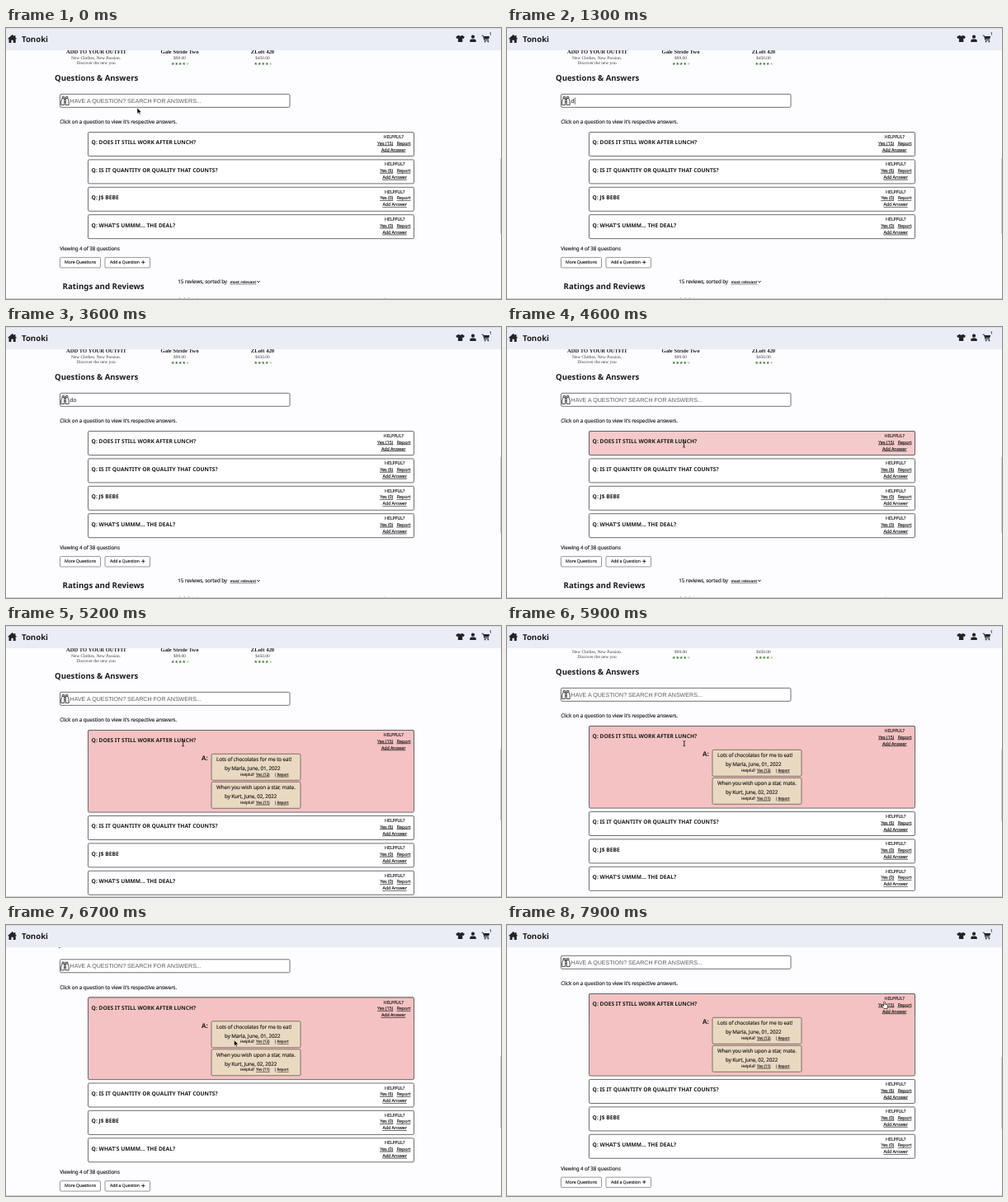
Animation, 600 px wide and 329 px high, one loop 8000 ms. Source, as an HTML page:

```html
<!DOCTYPE html>
<html lang="en">
<head>
<meta charset="utf-8">
<title>Questions &amp; Answers</title>
<style>
html, body { margin: 0; width: 100%; height: 100%; overflow: hidden; background: #fdfcfe; }
svg { display: block; width: 600px; height: 329px; }
text { font-family: "Noto Sans", "Open Sans", sans-serif; fill: #1c1c1e; letter-spacing: -.018em;
  stroke: #1c1c1e; stroke-width: .13; text-rendering: geometricPrecision; white-space: pre; }
.b { font-weight: 700; letter-spacing: 0; stroke: none; }
.m { text-anchor: middle; }
.e { text-anchor: end; }
.u { text-decoration: underline; text-decoration-thickness: .4px; text-underline-offset: .5px; }
.serif { font-family: "Liberation Serif", serif; letter-spacing: 0; stroke: none; }
.arial { font-family: "Liberation Sans", Arial, sans-serif; letter-spacing: 0; stroke: none; }
.star { font-family: "DejaVu Sans", sans-serif; letter-spacing: 0; fill: #2c7a1b; stroke: none; }
.off { fill: #bcc4ba; }
.hint { fill: #5e5e63; }
.soft { fill: #3c3c40; }
.box { fill: #fff; stroke: #55555a; stroke-width: .85; }
.btn { fill: #fff; stroke: #85858a; stroke-width: .85; }
.note { fill: #ead9c1; stroke: #6b5f56; stroke-width: .85; }
.line { fill: none; stroke: #1c1c1e; }
.ink { fill: #222326; }
</style>
</head>
<body>
<svg id="stage" viewBox="0 0 600 329"></svg>
<script>
const LOOP = 8000, STEP = 100;
const GROW = 70.6;      // height added by the opened answers
const COUNT_ROW = 13;   // height of the "Viewing" row

const text = (x, y, size, str, cls = '', id = '') =>
  `<text x="${x}" y="${y}" font-size="${size}" class="${cls}" id="${id}">${str}</text>`;
const rect = (x, y, w, h, cls, r = 1.6) =>
  `<rect x="${x}" y="${y}" width="${w}" height="${h}" rx="${r}" class="${cls}"/>`;
const stars = (x, y, size, on) =>
  text(x, y, size, `${'★'.repeat(on)}<tspan class="off">${'★'.repeat(5 - on)}</tspan>`, 'star');

const product = (x, name, price) =>
  text(x, 30.8, 6.67, name, 'serif b m') +
  text(x, 37.8, 5.4, price, 'serif m soft') +
  stars(x - 10.5, 44.8, 5, 4);

const answer = (y, words, by, yes) =>
  rect(249, y, 108, 32, 'note') +
  text(255, y + 8.8, 6.3, words) +
  text(265, y + 20.1, 6.3, by) +
  text(284, y + 26.5, 4.6, 'Helpful?') +
  text(303, y + 26.5, 4.8, `Yes (${yes})`, 'u') +
  text(325, y + 26.5, 4.4, '|') +
  text(328.5, y + 26.5, 4.6, 'Report', 'u');

const card = (i) => {
  const mid = i ? 471.2 : 469.6;
  return `<g id="card${i}">` +
    rect(99.5, 0, 395, 29, 'box') +
    (i ? '' : '<rect id="tint" x="99.5" width="395" rx="1.6" fill="#f4c2c2" stroke="#55555a" stroke-width=".85"/>') +
    text(103.6, 14.9, 6.67, '', 'b', 'q' + i) +
    text(mid, 7.6, 5.4, 'HELPFUL?', 'm') +
    text(469.2, 15, 5.6, '', 'e u', 'yes' + i) +
    text(490.4, 15, 5.4, 'Report', 'e u') +
    text(mid, 23, 5.4, 'Add Answer', 'm u') +
    (i ? '' : '<g id="answers">' + text(237, 36.6, 7.8, 'A:', 'b') +
      answer(28.8, 'Lots of chocolates for me to eat!', 'by Marla, June, 01, 2022', 12) +
      answer(62.8, 'When you wish upon a star, mate.', 'by Kurt, June, 02, 2022', 11) + '</g>') +
    '</g>';
};

const page =
  text(109.5, 30.8, 6.6, 'ADD TO YOUR OUTFIT', 'serif b m') +
  text(109, 37.8, 5.4, 'New Clothes, New Passion.', 'serif m soft') +
  text(109, 44.4, 5.4, 'Discover the new you', 'serif m soft') +
  product(210.5, 'Gale Stride Two', '$99.00') +
  product(311, 'ZLoft 420', '$450.00') +
  text(59, 64, 9.6, 'Questions &amp; Answers', 'b') +
  rect(65.5, 80.3, 278.5, 16, 'box') +
  `<path class="line" stroke-width=".8" d="M66.8 93.4v-4.4l1.3-3.4v-2h2.6v9.8zM76.2 93.4v-4.4l-1.3-3.4v-2h-2.6v9.8zM70.7 86.6h1.6M70.7 89.8h1.6M68.1 85.4h2.6M72.3 85.4h2.6"/>` +
  text(77.6, 90.9, 7.08, '', 'arial', 'field') +
  `<rect id="caret" y="84.5" width=".7" height="8.2" class="ink"/>` +
  text(65.2, 116.2, 6.3, "Click on a question to view it's respective answers.") +
  [0, 1, 2, 3].map(card).join('') +
  '<g id="below">' +
  text(65.2, 270.1, 6.3, 'Viewing 4 of 38 questions', '', 'count') +
  rect(65.5, 278.6, 49, 12.4, 'btn', 1) + text(90, 286.3, 5.25, 'More Questions', 'm') +
  rect(120, 278.6, 54.5, 12.4, 'btn', 1) + text(126, 286.3, 5.15, 'Add a Question') +
  `<path class="line" stroke-width=".9" d="M164.2 284.4h4.2M166.3 282.3v4.2"/>` +
  text(68.5, 316.7, 9.7, 'Ratings and Reviews', 'b') +
  text(208.3, 310, 6.3, '15 reviews, sorted by') +
  text(271.4, 309.8, 4.6, 'most relevant', 'b u') +
  `<path class="line" stroke-width="1" d="M304.3 307.2l1.7 1.7 1.7-1.7"/>` +
  stars(208, 331.2, 6, 3) +
  `<circle class="ink" cx="459" cy="328.9" r="1.2"/><path class="ink" d="M456.6 332.6q0-2.2 2.4-2.2t2.4 2.2zM460.8 328.6h1.8v.8h-1.8z"/>` +
  text(466, 332.2, 5, 'somereader,') + text(498.5, 332.2, 5.1, 'May 25, 2022') +
  text(68.5, 341.5, 12, '3.7') +
  text(208.3, 345.6, 7.6, 'think it is fine', 'b') +
  '</g>';

const header =
  '<rect width="600" height="27" fill="#eaedf5"/><rect width="600" height="1" fill="#d9dbe1"/>' +
  `<path class="ink" d="M7.6 8l2.4 2.1V8.9h1.4v2.5l2 1.8h-1.7V18H8.8v-3.3H6.4V18H3.5v-4.8H1.8z"/>` +
  text(19, 16.7, 9.65, 'Tonoki', 'b') +
  `<path class="ink" d="M548.5 8.8q2.2 1.7 4.4 0l3 1.9-1.2 2.4-1.4-.6V17h-5.4v-4.5l-1.4.6-1.3-2.4z"/>` +
  `<circle class="ink" cx="566" cy="10.7" r="2.1"/><path class="ink" d="M562.2 17v-1.2q0-2.3 2.4-2.3h2.8q2.4 0 2.4 2.3V17z"/>` +
  `<path class="line" stroke-width=".9" d="M576.6 9.2h1.7l1.6 5.6h5.2"/><path class="ink" d="M578.8 10.1h7.4l-1.1 3.5h-5.3z"/>` +
  `<circle class="ink" cx="580.6" cy="16.4" r=".9"/><circle class="ink" cx="584.4" cy="16.4" r=".9"/>` +
  text(585.8, 8.6, 5, '1');

const pointers = {
  arrow: '<path d="M0 0v7.2l1.7-1.6 1.1 2.6 1.2-.5-1.1-2.5h2.3z" fill="#000" stroke="#fff" stroke-width=".5"/>',
  beam: '<path class="line" stroke-width=".9" d="M-1.4-3.1Q0-3.1 0-2.2 0-3.1 1.4-3.1M0-2.2V2.2M-1.4 3.1Q0 3.1 0 2.2 0 3.1 1.4 3.1"/>',
  hand: '<path d="M-.8.6Q0-.5.8.6v2.6l2.6.6q.8.3.7 1.2l-.6 3.4h-4.2L-3.3 5.2q0-1.1 1.1-.8l1.4 1z" fill="#fff" stroke="#111" stroke-width=".7"/>'
};

const stage = document.getElementById('stage');
stage.innerHTML = `<g id="page">${page}</g>${header}` +
  '<rect id="thumb" x="599" width="1" fill="#cbcbd0"/>' +
  '<rect y="328" width="600" height="1" fill="#cfcfd4"/>' +
  '<g id="pointer">' + Object.entries(pointers).map(([k, s]) => `<g id="${k}">${s}</g>`).join('') + '</g>';

const el = {};
stage.querySelectorAll('[id]').forEach(n => { if (n.id) el[n.id] = n; });
const show = (n, on) => n.setAttribute('visibility', on ? 'visible' : 'hidden');
const move = (n, x, y) => n.setAttribute('transform', `translate(${x} ${y})`);

const hint = 'HAVE A QUESTION? SEARCH FOR ANSWERS...';
const typed = [[0, ''], [1300, 'd'], [1400, 'do'], [1600, 'doe'], [1700, 'does'], [1800, 'does '], [1900, 'does i'],
  [3200, 'does '], [3300, 'does'], [3500, 'doe'], [3600, 'do'], [3700, 'd'], [3800, '']];
const caret = [[0, 0], [900, 1], [2400, 0], [2800, .5], [3000, 1], [3200, 0]];
const kind = [[0, 'arrow'], [300, 'beam'], [1300, ''], [4300, 'beam'], [4400, 'arrow'], [4500, 'beam'],
  [6600, 'arrow'], [7700, 'hand']];
const path = [[0, 159, 97], [100, 159, 97], [600, 132, 88.5], [4300, 132, 88.5], [4600, 214.5, 143],
  [6500, 215, 142.5], [6900, 338, 137], [7400, 425, 117], [7800, 457.5, 93]];
const scroll = [[0, 0], [5800, 0], [5900, 5], [6100, 13], [6400, 25.7], [6700, 38.5], [6900, 43]];
const all = [['DOES IT STILL WORK AFTER LUNCH?', 15], ['IS IT QUANTITY OR QUALITY THAT COUNTS?', 6],
  ['J$ BEBE', 0], ["WHAT'S UMMM... THE DEAL?", 0]];
const hard = ['DOES IT WORK HARDCODED?', 0];
const found = [all[0], hard, hard, hard];

const at = (steps, t) => steps.filter(s => s[0] <= t).pop()[1];
const track = (keys, t, i = 1) => {
  const n = keys.findIndex(k => k[0] > t);
  if (n < 0) return keys[keys.length - 1][i];
  const a = keys[n - 1], b = keys[n];
  return a[i] + (b[i] - a[i]) * (t - a[0]) / (b[0] - a[0]);
};

function draw(t) {
  const word = at(typed, t), filtered = word.length > 2, open = t >= 5200;
  const top = track(scroll, t), extra = open ? GROW : 0;

  move(el.page, 0, -top);
  el.field.textContent = word || hint;
  el.field.setAttribute('class', word ? 'arial' : 'arial hint');
  el.caret.setAttribute('opacity', at(caret, t));
  el.caret.setAttribute('x', 77.6 + (word ? el.field.getComputedTextLength() : 0) + .3);

  (filtered ? found : all).forEach(([q, yes], i) => {
    el['q' + i].textContent = 'Q: ' + q;
    el['yes' + i].textContent = `Yes (${yes})`;
    move(el['card' + i], 0, 126.5 + i * 33.4 + (i ? extra : 0));
  });
  const hover = Math.min(1, Math.max(0, (t - 4430) / 300));
  el.tint.setAttribute('opacity', 1 - (1 - hover) ** 2.3);
  el.tint.setAttribute('height', 29 + extra);
  show(el.answers, open);

  move(el.below, 0, extra - (filtered ? COUNT_ROW : 0));
  show(el.count, !filtered);

  const height = 1176 + extra - (filtered ? COUNT_ROW : 0);
  el.thumb.setAttribute('y', (565 + top) / height * 329);
  el.thumb.setAttribute('height', 329 / height * 329);

  const shape = at(kind, t);
  Object.keys(pointers).forEach(k => show(el[k], k === shape));
  move(el.pointer, track(path, t), track(path, t, 2));
}

const start = performance.now();
let last = -1;
function tick() {
  const t = Math.floor((performance.now() - start) % LOOP / STEP) * STEP;
  if (t !== last) draw(last = t);
  requestAnimationFrame(tick);
}
tick();
</script>
</body>
</html>
```
